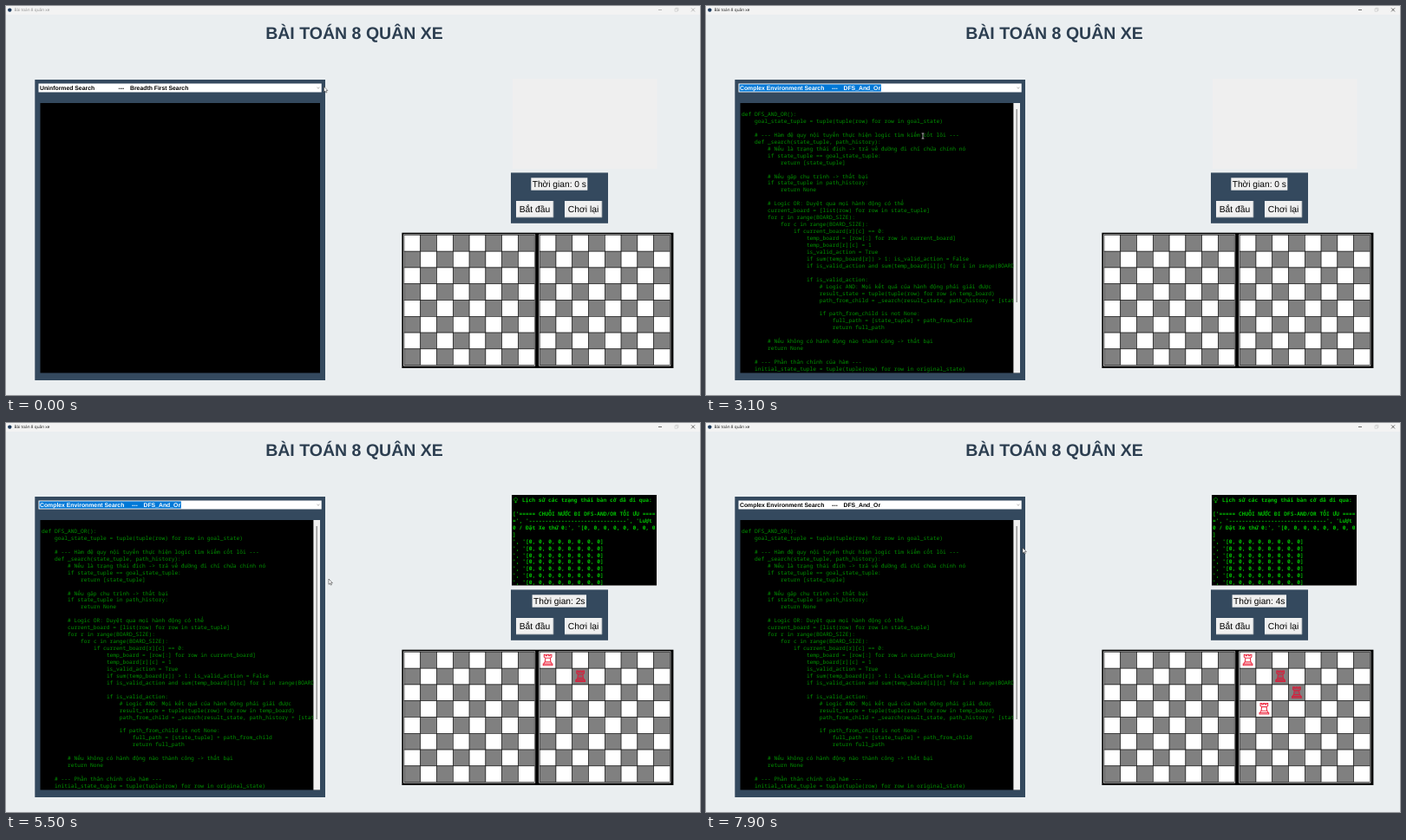
Recreate the animation shown at these times as an HTML page. Size 800 by 449 pixels, loop 8 s.

```html
<!DOCTYPE html>
<html lang="vi">
<head>
<meta charset="utf-8">
<title>Bài toán 8 quân xe</title>
<style>
html, body { margin: 0; width: 100%; height: 100%; overflow: hidden; background: #eaeef0; }
svg { display: block; width: 100%; height: 100%; }
text { white-space: pre; text-rendering: geometricPrecision; }
.arial { font-family: "Liberation Sans", Arial, sans-serif; }
.ui { font-family: "Open Sans", "Noto Sans", sans-serif; }
.mono { font-family: "Noto Sans Mono", "DejaVu Sans Mono", monospace; font-size: 6.24px; }
.bold { font-weight: 700; }
</style>
</head>
<body>
<svg id="stage" viewBox="0 0 800 449" preserveAspectRatio="none"></svg>
<script>
const LOOP = 8000;
const OPEN_AT = 400, PICK_AT = 2950, UNSELECT_AT = 5900;
const ROOK_TIMES = [4400, 5450, 6500, 7550];
const ROOK_CELLS = [[0, 0], [1, 2], [2, 3], [3, 1]];
const CELL = 18.78, BOARD_Y = 264.4, LEFT_BOARD = 459, RIGHT_BOARD = 615.2;
const ROW = 6.67, LIST_TOP = 100.2;
const NAVY = '#34495e', BLUE = '#0078d7', CODE_GREEN = '#009400', LOG_GREEN = '#00c000';

const METHODS = [
  ['Uninformed', 'Breadth First Search'], ['Uninformed', 'Depth First Search'],
  ['Uninformed', 'Uniform Cost Search'], ['Uninformed', 'Depth Limited Search'],
  ['Uninformed', 'Iterative Deepening Search'], ['Informed', 'Greedy Search'],
  ['Informed', 'A_star'], ['Local', 'Hill_Climbing'], ['Local', 'Simulated_Annealing'],
  ['Local', 'Genetic_Algorithm'], ['Local', 'Beam_Search'],
  ['Complex Environment', 'DFS_And_Or'], ['Complex Environment', 'Belief_State_Search'],
  ['Complex Environment', 'Partial_Observable_Search']
];

const CODE = `def DFS_AND_OR():
    goal_state_tuple = tuple(tuple(row) for row in goal_state)

    # --- Hàm đệ quy nội tuyến thực hiện logic tìm kiếm cốt lõi ---
    def _search(state_tuple, path_history):
        # Nếu là trạng thái đích -> trả về đường đi chỉ chứa chính nó
        if state_tuple == goal_state_tuple:
            return [state_tuple]

        # Nếu gặp chu trình -> thất bại
        if state_tuple in path_history:
            return None

        # Logic OR: Duyệt qua mọi hành động có thể
        current_board = [list(row) for row in state_tuple]
        for r in range(BOARD_SIZE):
            for c in range(BOARD_SIZE):
                if current_board[r][c] == 0:
                    temp_board = [row[:] for row in current_board]
                    temp_board[r][c] = 1
                    is_valid_action = True
                    if sum(temp_board[r]) > 1: is_valid_action = False
                    if is_valid_action and sum(temp_board[i][c] for i in range(BOARD_SIZE)) > 1: is_valid_action = False

                    if is_valid_action:
                        # Logic AND: Mọi kết quả của hành động phải giải được
                        result_state = tuple(tuple(row) for row in temp_board)
                        path_from_child = _search(result_state, path_history + [state_tuple])

                        if path_from_child is not None:
                            full_path = [state_tuple] + path_from_child
                            return full_path

        # Nếu không có hành động nào thành công -> thất bại
        return None

    # --- Phần thân chính của hàm ---
    initial_state_tuple = tuple(tuple(row) for row in original_state)`;

const ZEROS = Array(8).fill(0).join(', ');
const HISTORY = [
  "['===== CHUỖI NƯỚC ĐI DFS-AND/OR TỐI ƯU ====",
  `=', '${'-'.repeat(30)}', 'Lượt`,
  `0 / Đặt Xe thứ 0:', '[${ZEROS}`,
  ']',
  ...Array(7).fill(`', '[${ZEROS}]`)
];

const esc = s => s.replace(/&/g, '&amp;').replace(/</g, '&lt;').replace(/>/g, '&gt;');
const rect = (x, y, x2, y2, fill, extra = '') =>
  `<rect x="${x}" y="${y}" width="${x2 - x}" height="${y2 - y}" fill="${fill}" ${extra}/>`;
// An empty fill is inherited from the parent group, an empty size from the class.
const text = (x, y, s, cls, size, fill = '', extra = '') =>
  `<text x="${x}" y="${y}" class="${cls}" ${size ? `font-size="${size}"` : ''} ${fill ? `fill="${fill}"` : ''} ${extra}>${esc(s)}</text>`;
const path = (d, stroke, width, fill = 'none', extra = '') =>
  `<path d="${d}" stroke="${stroke}" stroke-width="${width}" fill="${fill}" ${extra}/>`;
const group = (id, body, extra = '') => `<g id="${id}" ${extra}>${body}</g>`;
const centred = 'text-anchor="middle"';

function board(x0) {
  let out = rect(x0 - 0.9, BOARD_Y - 0.9, x0 + CELL * 8 + 0.9, BOARD_Y + CELL * 8 + 0.9, '#f4f4f4');
  for (let i = 0; i < 64; i++) {
    const r = i >> 3, c = i & 7, x = x0 + c * CELL, y = BOARD_Y + r * CELL;
    out += rect(x, y, x + CELL, y + CELL, (r + c) % 2 ? '#808080' : '#fff', 'stroke="#111" stroke-width=".6"');
  }
  return out;
}

function rook([r, c], i) {
  const dark = (r + c) % 2, x = RIGHT_BOARD + (c + 0.5) * CELL, y = BOARD_Y + (r + 0.5) * CELL - 0.3;
  const d = 'M-5.3 6.2V4.6H-4.3V3.4L-3.3 2.4-2.8-2.2-4.3-3.4V-6.2H-2.5V-4.9H-1V-6.2H1V-4.9H2.5V-6.2H4.3V-3.4L2.8-2.2 3.3 2.4 4.3 3.4V4.6H5.3V6.2Z' +
    'M-2.8-2.2H2.8M-3.3 2.4H3.3M-4.3 4.6H4.3';
  return group('rook' + i, path(d, dark ? '#d81f3c' : '#ee3047', 1.1, dark ? '#8a5f66' : '#fff'), `transform="translate(${x} ${y})"`);
}

function button(x, x2, label) {
  return rect(x, 225, x2, 244, '#f0f0f0') +
    path(`M${x} 244H${x2}V225`, '#8d979f', 0.8) +
    text((x + x2) / 2, 238, label, 'arial', 10.3, '#000', centred);
}

const comboLabel = (id, name, dashX, method, methodX) =>
  group(id, [[39, name + ' Search'], [dashX, '---'], [methodX, method]]
    .map(([x, s]) => text(x, 96.7, s, 'arial bold', 6.85)).join(''));

function listRow([kind, method], i) {
  const wide = kind.startsWith('Complex'), y = LIST_TOP + i * ROW + 5;
  return '<g class="item">' + text(38.5, y, kind + ' Search', 'ui', 4.7) +
    text(wide ? 109 : 97.5, y, '---', 'ui', 4.9) +
    text(wide ? 119 : 107.5, y, method, 'ui', 4.7) + '</g>';
}

const codeLines = CODE.split('\n').map((line, i) => {
  const body = line.trimStart();
  return body && text(41 + (line.length - body.length) * 3.744, 127 + i * 7.946, body, 'mono', 0, CODE_GREEN);
}).join('');

const historyLines = HISTORY.map((s, i) =>
  text(584, 106.8 + i * 7.95, s, 'mono bold', 0, LOG_GREEN)).join('');

const stage = document.getElementById('stage');
stage.innerHTML =
  `<defs><clipPath id="codeClip">${rect(40, 112, 354.3, 423.5, '#000')}</clipPath>
   <clipPath id="listClip">${rect(37.5, 100, 363.5, 167.5, '#000')}</clipPath>
   <clipPath id="historyClip">${rect(583, 83, 750, 187.5, '#000')}</clipPath></defs>` +
  rect(0, 0, 800, 449, '#eaeef0') +
  rect(0, 0, 800, 10, '#f3f3f3') +
  '<circle cx="4.3" cy="4.6" r="2.2" fill="#1d3a5c"/>' +
  group('titleBar', text(9.5, 6.4, 'Bài toán 8 quân xe', 'ui', 4.73, 'currentColor') +
    path('M752 4.5H756M790 2.4L794 6.4M794 2.4L790 6.4', 'currentColor', 0.6)) +
  path('M771 3.2H774V6.2H771ZM772 3.2V2.3H775V5.3H774', '#bbb', 0.5) +
  text(401.5, 37.6, 'BÀI TOÁN 8 QUÂN XE', 'arial bold', 19.55, '#2c3e50', centred) +

  rect(33.3, 85, 368, 432, NAVY) +
  rect(37.5, 89.5, 363.7, 99.5, '#fff') +
  group('selection', rect(38.5, 90.4, 201.8, 98.6, BLUE)) +
  comboLabel('comboBefore', 'Uninformed', 129.5, 'Breadth First Search', 143) +
  comboLabel('comboAfter', 'Complex Environment', 145, 'DFS_And_Or', 158.5) +
  group('hotButton', rect(356.8, 89.8, 363.4, 99.2, '#cce4f7', `stroke="${BLUE}" stroke-width=".5"`)) +
  path('M358.5 93.9L360 95.3L361.5 93.9', '#777', 0.6) +
  rect(39.5, 112, 362, 423.5, '#000') +
  group('code', rect(354.4, 112, 362, 423.5, '#f1f1f1') + rect(357.5, 119, 358.9, 342, '#8f8f8f') +
    `<g clip-path="url(#codeClip)">${group('codeText', codeLines)}</g>`) +
  group('list', rect(37.5, 99.5, 363.7, 167.5, '#fff') + rect(356.5, 99.8, 363.5, 167.3, '#f1f1f1') +
    `<g clip-path="url(#listClip)">` +
    group('hover', rect(38, LIST_TOP, 356, LIST_TOP + ROW, BLUE)) +
    group('items', METHODS.map(listRow).join('')) + '</g>' +
    group('thumb', rect(359.2, 107, 360.7, 138, '#868686'))) +

  rect(584, 84, 750.5, 188, '#efefef') +
  group('history', rect(583, 83, 750, 187.5, '#000') + `<g clip-path="url(#historyClip)">` +
    path('M587.5 90.2A1.9 1.9 0 1 1 587.6 90.2V92.4M586.3 91.4H588.8', LOG_GREEN, 0.7) +
    text(595, 91, 'Lịch sử các trạng thái bàn cờ đã đi qua:', 'mono bold', 0, LOG_GREEN) +
    historyLines + '</g>') +
  rect(582, 192.4, 694, 250.8, NAVY) +
  `<rect id="clockBox" y="198.3" height="14.4" fill="#f0f0f0"/>` +
  text(637.8, 209, '', 'arial', 10.2, '#000', centred + ' id="clock"') +
  button(588, 631, 'Bắt đầu') + button(644, 687, 'Chơi lại') +
  rect(456.4, 261.7, 769.4, 418, '#000') +
  board(LEFT_BOARD) + board(RIGHT_BOARD) + ROOK_CELLS.map(rook).join('') +
  group('arrow', path('M0 0V6.3L1.4 5 2.4 7.1 3.4 6.7 2.5 4.6H4.4Z', '#222', 0.5, '#fff')) +
  group('beam', path('M-1.4-3H1.4M0-3V3M-1.4 3H1.4', '#e8e8e8', 0.7));

const $ = id => document.getElementById(id);
const items = [...document.querySelectorAll('.item')];
const show = (id, on) => $(id).setAttribute('visibility', on ? 'visible' : 'hidden');
const move = (id, x, y) => $(id).setAttribute('transform', `translate(${x} ${y})`);

// time, x, y
const POINTER = [
  [0, 366.5, 93], [350, 361, 94.5], [550, 360, 95], [900, 318, 110], [1200, 303.5, 124.7],
  [1600, 287, 139], [2100, 273.8, 142], [2800, 254, 149], [3100, 250, 150], [3700, 245, 152],
  [4250, 601, 224], [4800, 601, 224], [5500, 372, 180], [5900, 290, 168], [6400, 316, 167],
  [6900, 290, 168], [7300, 290, 166], [7800, 365, 144], [8000, 365, 144]
];

const ease = p => p * p * (3 - 2 * p);
const ramp = (t, a, b) => Math.min(1, Math.max(0, (t - a) / (b - a)));

function pointerAt(t) {
  const i = POINTER.findIndex((k, n) => n && t <= k[0]);
  const [t0, x0, y0] = POINTER[i - 1], [t1, x1, y1] = POINTER[i];
  const p = ease((t - t0) / (t1 - t0));
  return [x0 + (x1 - x0) * p, y0 + (y1 - y0) * p];
}

function render(t) {
  const [x, y] = pointerAt(t);
  const open = t >= OPEN_AT && t < PICK_AT, picked = t >= PICK_AT;
  const selected = picked && t < UNSELECT_AT;

  $('titleBar').style.color = t < OPEN_AT ? '#8d8d8d' : '#111';
  show('list', open);
  show('hotButton', open);
  show('comboBefore', !picked);
  show('comboAfter', picked);
  show('selection', selected);
  $('comboAfter').setAttribute('fill', selected ? '#fff' : '#000');

  const scroll = Math.round(4 * ramp(t, 1350, 1950));
  const row = Math.min(9, Math.max(0, Math.floor((y - LIST_TOP) / ROW)));
  move('items', 0, -scroll * ROW);
  move('thumb', 0, scroll * 2.4);
  move('hover', 0, row * ROW);
  items.forEach((item, i) => item.setAttribute('fill', i === row + scroll ? '#fff' : '#000'));

  show('code', picked);
  move('codeText', -44.9 * (ramp(t, 6000, 6350) - ramp(t, 6900, 7250)), 0);

  const placed = ROOK_TIMES.filter(at => t >= at).length;
  ROOK_TIMES.forEach((at, i) => show('rook' + i, t >= at));
  show('history', placed > 0);
  $('clock').textContent = 'Thời gian: ' + (placed ? placed + 's' : '0 s');
  const half = placed ? 31.2 : 32.5;
  $('clockBox').setAttribute('x', 637.8 - half);
  $('clockBox').setAttribute('width', half * 2);

  const overCode = picked && x > 40 && x < 354 && y > 112 && y < 423;
  show('beam', overCode);
  show('arrow', !overCode);
  move('beam', x, y);
  move('arrow', x, y);
}

const start = performance.now();
function tick() {
  render((performance.now() - start) % LOOP);
  requestAnimationFrame(tick);
}
tick();
</script>
</body>
</html>
```
